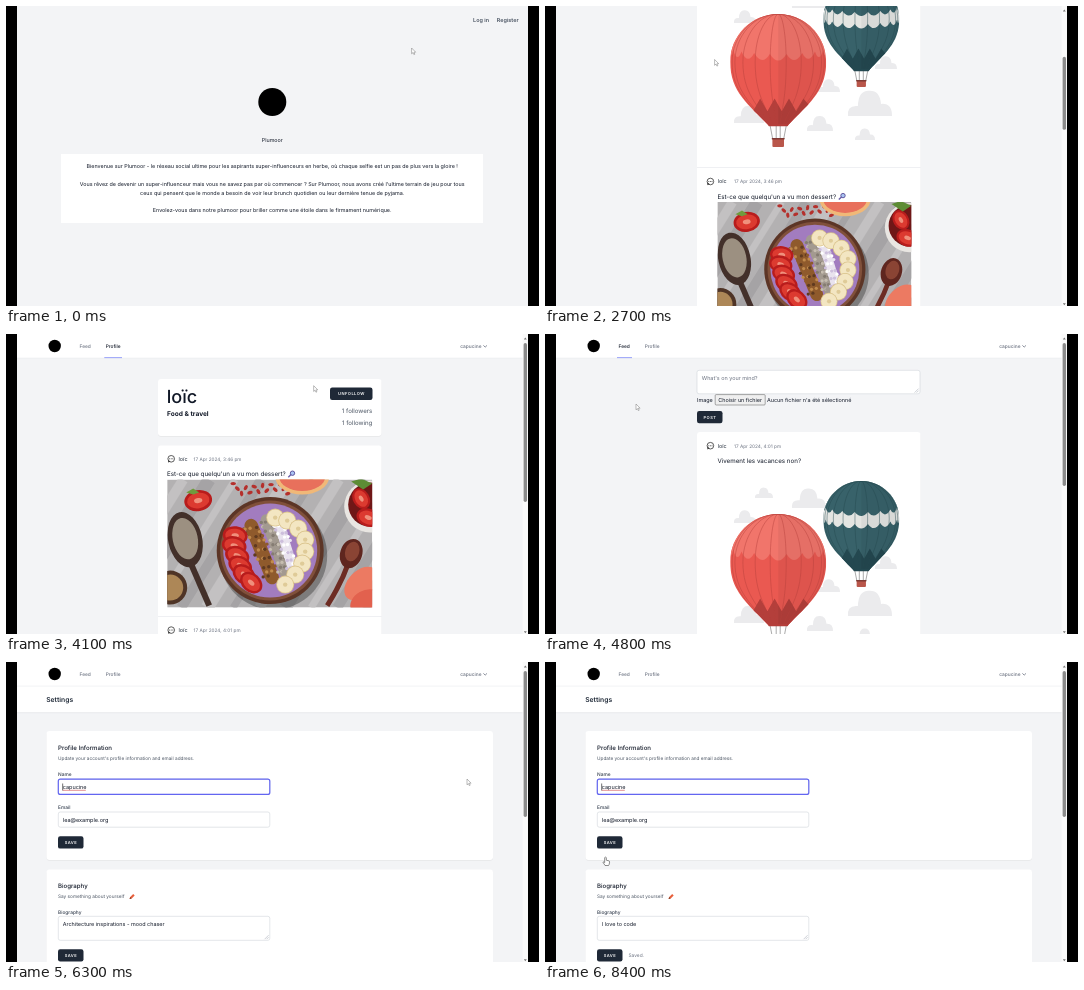
An HTML page that plays this animation: 533 by 300 pixels, repeating every 8.5 s.

```html
<!DOCTYPE html>
<html lang="fr">
<head>
<meta charset="utf-8">
<title>Plumoor</title>
<style>
html,body{margin:0;width:100%;height:100%;overflow:hidden;background:#000}
svg{display:block;width:100%;height:100%}
text{font-family:Inter,Lato,sans-serif;white-space:pre;text-rendering:geometricPrecision}
</style>
</head>
<body>
<svg id="stage" viewBox="0 0 533 300" xmlns="http://www.w3.org/2000/svg"></svg>
<script>
const LOOP = 8500;
const BRAND = 'Plumoor', USER = 'capucine', AUTHOR = 'loïc', EMAIL = 'lea@example.org';
const INK = '#111827', GREY = '#6b7280', LINE = '#d1d5db', INDIGO = '#6366f1';
const OLD_BIO = 'Architecture inspirations - mood chaser', NEW_BIO = 'I love to code';
const FONT_SCALE = .928; // Inter runs wide for its size

// --- drawing helpers, all return SVG markup ---
const text = (x, y, s, size = 5.86, fill = INK, weight = 400, extra = '') =>
  `<text x="${x}" y="${y}" font-size="${(size * FONT_SCALE).toFixed(2)}" fill="${fill}" font-weight="${weight}" ${extra}>${s}</text>`;
const rect = (x, y, w, h, fill, extra = '') =>
  `<rect x="${x}" y="${y}" width="${w}" height="${h}" fill="${fill}" ${extra}/>`;
const circle = (x, y, r, fill, extra = '') => `<circle cx="${x}" cy="${y}" r="${r}" fill="${fill}" ${extra}/>`;
const oval = (x, y, rx, ry, fill, turn = 0) =>
  `<ellipse cx="${x}" cy="${y}" rx="${rx}" ry="${ry}" fill="${fill}" transform="rotate(${turn} ${x} ${y})"/>`;
const path = (d, fill = 'none', extra = '') => `<path d="${d}" fill="${fill}" ${extra}/>`;
const stroke = (color, w) => `stroke="${color}" stroke-width="${w}"`;
const group = (id, body, extra = '') => `<g id="${id}" ${extra}>${body}</g>`;
const range = (n, f) => Array.from({length: n}, (_, i) => f(i)).join('');
const MIDDLE = 'text-anchor="middle"', END = 'text-anchor="end"';

const card = (x, y, w, h) =>
  rect(x, y + .7, w, h, '#000', 'rx="3" opacity=".06"') + rect(x, y, w, h, '#fff', 'rx="3"');
const field = (x, y, w, h, fill = '#fff') => rect(x, y, w, h, fill, `rx="2" ${stroke(LINE, .6)}`);
const ring = (id, x, y, w, h) => group(id, rect(x, y, w, h, 'none', `rx="2" ${stroke(INDIGO, 1.2)}`));
const button = (x, y, w, label) => rect(x, y, w, 12.3, '#1f2937', 'rx="2.2"') +
  text(x + w / 2 + .2, y + 7.7, label, 4.4, '#fff', 600, MIDDLE + ' letter-spacing=".42"');
const grip = (x, y) => path(`M${x - 4} ${y}l4-4M${x - 2} ${y}l2-2`, 'none', stroke('#9ca3af', .5));

function nav(active) {
  const link = (x, s) => text(x, 14.4, s, 5.2, active === s ? INK : GREY, 500);
  const bar = {Feed: [72, 15], Profile: [98.3, 17.7]}[active];
  return rect(11, 0, 511, 24, '#fff') + rect(11, 23.8, 511, .5, '#e5e7eb') + circle(48.7, 12, 6.2, '#000') +
    link(73.5, 'Feed') + link(99.7, 'Profile') + (bar ? rect(bar[0], 23.3, bar[1], .8, '#818cf8') : '') +
    text(475.5, 14.3, USER, 5.2, GREY, 500, END) + path('M477.4 11.4l1.8 1.7 1.8-1.7', 'none', stroke(GREY, .8));
}

const magnifier = (x, y) =>
  path(`M${x - 3.2} ${y + 3.2}L${x} ${y}`, 'none', stroke('#6b5fa8', 1.4)) +
  circle(x + 1, y - .8, 2.2, '#a9c4f2', stroke('#564a96', .9));

const header = (x, y, time, dateX) =>
  circle(x + 4, y - 1.9, 3.3, '#fff', stroke('#333', .8)) + path(`M${x + .9} ${y + 1.8}l.3-2.6 1.9 1.5z`, '#333') +
  range(3, i => circle(x + 2.4 + i * 1.6, y - 1.9, .5, '#333')) +
  text(x + 11.3, y, AUTHOR, 5.86, '#1f2937') + text(dateX, y, '17 Apr 2024, ' + time, 5.1, GREY);

// --- illustration ---
function cloud(x, base, w) {
  const r = w / 2;
  return path(`M${x - r} ${base}q${-r * .05} ${-r * .5} ${r * .45} ${-r * .45}q${r * .02} ${-r * .75} ${r * .55} ${-r * .7}` +
    `q${r * .45} 0 ${r * .5} ${r * .6}q${r * .5} ${-r * .05} ${r * .5} ${r * .55}z`, '#ebebed');
}

function airship(id, cx, top, rx, wide, neck, n, c) {
  const hb = neck - wide, ha = wide - top;
  const gore = u => {
    const a = cx + u * rx;
    return `M${cx} ${top}C${cx + .55 * u * rx} ${top} ${a} ${wide - .55 * ha} ${a} ${wide}` +
      `C${a} ${wide + .48 * hb} ${cx + u * (n + .5 * (rx - n))} ${neck - .32 * hb} ${cx + u * n} ${neck}`;
  };
  const half = u => gore(u) + `H${cx}z`;
  const us = Array.from({length: 10}, (_, i) => Math.sin((i - 4.5) / 9 * Math.PI));
  // scalloped edge running across the envelope
  const edge = (y, dip) => us.slice(1).map((u, i) => {
    const m = (u + us[i]) / 2, end = y + 7 * Math.sqrt(1 - u * u);
    return `Q${cx + m * rx} ${y + 7 * Math.sqrt(1 - m * m) + dip} ${cx + u * rx} ${end}`;
  }).join('');
  const zone = (y, dip, fill) => path(`M${cx - rx} ${top}V${y}` + edge(y, dip) + `V${top}z`, fill);
  return `<clipPath id="${id}"><path d="${half(-1) + half(1)}"/></clipPath><g clip-path="url(#${id})">` +
    rect(cx - rx, top, rx * 2, neck - top, c.body) +
    (c.band ? zone(top + 36, 9, c.band) + zone(top + 24, 8, c.body) : zone(top + 33, 13, c.light)) +
    path(`M${cx - rx} ${neck}V${neck - hb * .4}` +
      range(8, i => `L${cx - rx * .6 + (i + .5) * rx * .15} ${neck - hb * (.22 + .2 * (i % 2))}`) + `L${cx + rx} ${neck}z`, c.dark) +
    path(half(1), '#000', 'opacity=".05"') +
    us.map(u => path(gore(u * .96), 'none', stroke(c.dark, .45))).join('') + '</g>' +
    rect(cx - n, neck - 1, n * 2, 2.2, c.dark, 'rx="1"') +
    path(`M${cx - n * .8} ${neck + 1}l${n * .25} ${c.drop}M${cx + n * .8} ${neck + 1}l${-n * .25} ${c.drop}M${cx - 2} ${neck + 1}v${c.drop}M${cx + 2} ${neck + 1}v${c.drop}`, 'none', stroke('#555', .5)) +
    rect(cx - n * .58, neck + c.drop, n * 1.16, c.basket, '#b9564a', 'rx="1"') +
    rect(cx - n * .65, neck + c.drop, n * 1.3, 1.4, '#7f3a34', 'rx=".6"');
}

const scene = () =>
  [[200, 189, 22], [219, 164, 18], [264, 174, 34], [341, 235, 22], [284, 258, 22], [325, 282, 44], [204, 289, 30], [275, 297, 26], [320, 306, 20]]
    .map(a => cloud(...a)).join('') +
  airship('teal', 316.3, 147, 38, 185, 236, 8, {body: '#38626a', dark: '#244850', band: '#e4e5e2', drop: 10, basket: 7}) +
  airship('red', 233.2, 180, 48, 228, 291, 10, {body: '#ea5951', light: '#f1756b', dark: '#b43f3b', drop: 13, basket: 9});

// --- photo, 205 x 128 ---
function berry(x, y, r, turn) {
  return oval(x, y, r, r * .75, '#b81c1c', turn) + oval(x, y, r * .8, r * .55, '#dc3a30', turn) + oval(x, y, r * .3, r * .18, '#f0907c', turn);
}
// a strip of topping: solid base with scattered specks
function strip(n, x, y, dx, dy, spread, colors) {
  return path(`M${x} ${y}l${dx} ${dy}`, 'none', stroke(colors[0], spread * .9) + ' stroke-linecap="round"') +
    range(n, i => {
      const k = (i * .618) % 1, s = ((i * .414) % 1 - .5) * spread;
      return circle((x + dx * k + s).toFixed(1), (y + dy * k - s * .45).toFixed(1), 1.7, colors[i % colors.length]);
    });
}
const photo = () => rect(0, 0, 205, 128, '#b3b1b2') +
  range(12, i => path(`M${i * 26 - 90} 128L${i * 26 - 10} 0`, 'none', stroke(i % 2 ? '#c3c1c2' : '#a5a3a5', 7 + i % 3 * 3))) +
  range(14, i => oval(66 + i * 4.2, 4 + (i * 5) % 11, 2.8, 1.7, '#b5302c', i * 40)) +
  oval(135, -3, 27, 18, '#f0b878') + oval(135, -3, 23, 14.5, '#e8705c') +
  berry(31, 21, 14, -10) + path('M19 13l7-4 6 4-6 2z', '#6f9b3e') +
  circle(203, 27, 26, '#e9e6e2') + circle(203, 25, 22, '#6f1717') + berry(194, 19, 11, 60) + berry(201, 38, 12, 20) + path('M184 2l10-3 11 5-9 6z', '#5d8c35') +
  path('M22 80L42 126', 'none', stroke('#43302a', 6)) + oval(18, 60, 17, 28, '#43302a', -12) + oval(18, 59, 12.5, 21, '#9c9081', -12) +
  circle(3, 108, 17, '#4f3426') + circle(3, 108, 13, '#ad8757') +
  path('M181 84Q174 104 160 126', 'none', stroke('#6d2c23', 5)) + oval(184, 74, 11, 15, '#5f261f', 18) + oval(185, 72, 7, 10, '#8a4434', 18) +
  oval(194, 104, 20, 13, '#ec7a62', -45) + oval(198, 122, 16, 11, '#e2614e', -30) +
  circle(106, 76, 54, '#000', 'opacity=".3"') + circle(103, 71, 53.5, '#5c3526') + circle(103, 71, 50, '#80503a') + circle(103, 71, 47, '#a27cbf') +
  strip(40, 84, 46, 21, 52, 15, ['#8f5a2c', '#c08a4c', '#5f3a20']) +
  strip(44, 99, 40, 19, 54, 12, ['#a39a90', '#857c72', '#c6bdb0']) +
  strip(36, 112, 44, 14, 46, 11, ['#e9e3ee', '#fff', '#cdbfdc']) +
  [[68, 56], [67, 66], [70, 76], [73, 86], [77, 95], [84, 103]].map(([x, y], i) => berry(x, y, 12.5, 8 + i * 7)).join('') +
  [[108, 38], [120, 41], [131, 49], [138, 60], [138, 72], [135, 84], [128, 95], [118, 105]].map(([x, y]) =>
    circle(x, y, 9, '#d9c28a') + circle(x, y, 8.2, '#f3e6c2') + circle(x, y, 2.2, '#dfcb98')).join('');

// --- screens ---
const landing = text(467.1, 15.6, 'Log in', 5.86, '#4b5563', 600) + text(490.8, 15.6, 'Register', 5.86, '#4b5563', 600) +
  circle(266.3, 96, 14, '#000') + text(266.3, 136, BRAND, 5.8, INK, 400, MIDDLE) + rect(55, 148, 422, 69, '#fff') +
  [[162.4, `Bienvenue sur ${BRAND} - le réseau social ultime pour les aspirants super-influenceurs en herbe, où chaque selfie est un pas de plus vers la gloire !`],
   [180, `Vous rêvez de devenir un super-influenceur mais vous ne savez pas par où commencer ? Sur ${BRAND}, nous avons créé l'ultime terrain de jeu pour tous`],
   [189, 'ceux qui pensent que le monde a besoin de voir leur brunch quotidien ou leur dernière tenue de pyjama.'],
   [206.4, `Envolez-vous dans notre ${BRAND.toLowerCase()} pour briller comme une étoile dans le firmament numérique.`]]
    .map(([y, s]) => text(266.2, y, s, 5.8, INK, 400, MIDDLE)).join('');

const login = circle(266.3, 97.5, 6.8, '#000') + card(184, 115, 164.5, 99) +
  text(193, 126.4, 'Email', 5.2, '#374151', 500) + field(193, 129.6, 147, 15.6, '#e8f0fe') + text(197.5, 139.5, EMAIL, 6) +
  text(193, 156.6, 'Password', 5.2, '#374151', 500) + field(193, 159.8, 147, 15.4, '#e8f0fe') +
  range(10, i => circle(198.9 + i * 2.9, 168, .9, INK)) +
  rect(193.3, 182, 5.4, 5.4, '#fff', `rx="1" ${stroke(LINE, .6)}`) + text(202, 186.7, 'Remember me', 5.2, GREY) +
  text(305.5, 204.2, 'Forgot your password?', 5.1, GREY, 400, END + ' text-decoration="underline"') +
  button(310, 196, 30, 'LOG IN') + ring('mailRing', 193, 129.6, 147, 15.6) + ring('loginRing', 308.8, 194.8, 32.4, 14.7);

const feed = nav('Feed') + field(152, 36.3, 223, 23.5) + text(156.8, 45.6, "What's on your mind?", 5.86, GREY) + grip(373.6, 58.6) +
  text(152, 67.8, 'Image') + rect(170.2, 60.6, 50, 10.4, '#efefef', `rx="1" ${stroke('#555', .5)}`) +
  text(195.2, 67.8, 'Choisir un fichier', 5.86, INK, 400, MIDDLE) + text(222, 67.8, "Aucun fichier n'a été sélectionné") +
  button(152, 77, 25.5, 'POST') + card(152, 98, 223.5, 403) +
  header(161.4, 113.6, '4:01 pm', 189) + text(172.4, 129.4, 'Vivement les vacances non?', 6.7) + scene() +
  rect(152, 333, 223.5, .6, '#e5e7eb') +
  header(161.4, 349.4, '3:46 pm', 189) + text(172.4, 364.7, "Est-ce que quelqu'un a vu mon dessert?", 6.7) + magnifier(297, 362.4) +
  '<use href="#photo" transform="translate(172.4 368) scale(.946)"/>';

const profile = nav('Profile') + card(152, 45, 223.5, 57) + text(160.8, 68.6, AUTHOR, 19.5, INK, 500) +
  text(161, 81.6, 'Food &amp; travel', 7.1, INK, 700) +
  group('follow', button(333, 53.6, 33.5, 'FOLLOW')) + group('unfollow', button(324, 53.6, 42.5, 'UNFOLLOW')) +
  text(366.3, 79.4, '0 followers', 6.6, '#4b5563', 400, END + ' id="followers"') + text(366.3, 91.2, '1 following', 6.6, '#4b5563', 400, END) +
  card(152, 111.5, 223.5, 400) + header(161.2, 126.7, '3:46 pm', 187.5) +
  text(161, 142.4, "Est-ce que quelqu'un a vu mon dessert?", 6.7) + magnifier(285.5, 140) +
  '<use href="#photo" transform="translate(161.2 145.6)"/>' + rect(152, 282, 223.5, .6, '#e5e7eb') +
  header(161.2, 298, '4:01 pm', 187.5);

const label = (y, s) => text(52, y, s, 5.2, '#374151', 500);
const section = (y, h, title, sub) => card(40.5, y, 446.5, h) + text(52, y + 18.6, title, 6.6, INK, 500) + text(52, y + 28.8, sub, 5.1, '#4b5563');
const settings = rect(11, 24, 511, 26.5, '#fff') + rect(11, 50.5, 511, .7, '#e2e4e8') + nav('') +
  text(40.2, 40.2, 'Settings', 7.3, '#1f2937', 600) +
  section(69, 129, 'Profile Information', "Update your account's profile information and email address.") +
  label(113.9, 'Name') + field(52.3, 117.2, 211.5, 15.2) + ring('nameRing', 52.3, 117.2, 211.5, 15.2) +
  text(56.8, 127, USER, 5.9) + path('M56.8 128.3h23', 'none', stroke('#d04545', .6)) + group('nameCaret', rect(56.5, 121.5, .6, 7, '#111')) +
  label(147, 'Email') + field(52.3, 150, 211.5, 15.2) + text(56.8, 159.8, EMAIL, 6) + button(52, 174.3, 25.5, 'SAVE') +
  section(207.5, 103, 'Biography', 'Say something about yourself') +
  path('M123.6 237l.6-2 3-3 1.5 1.5-3 3z', '#e8603c') + path('M123.6 237l.6-2 1.4 1.5z', '#7a3b24') +
  label(252.3, 'Biography') + field(52.3, 254.3, 211.5, 24) + ring('bioRing', 52.3, 254.3, 211.5, 24) + grip(262.6, 277.2) +
  group('bioMark', rect(56.5, 258.2, 105, 7.4, '#a8c7fa')) + text(56.8, 264.2, '', 5.86, INK, 400, 'id="bio"') +
  button(52, 287.2, 25.5, 'SAVE') + text(83.5, 295.4, 'Saved.', 5.2, GREY, 400, 'id="saved"') +
  section(320, 175, 'Update Password', 'Ensure your account is using a long, random password to stay secure.') +
  label(364.9, 'Current Password') + field(52.3, 368.2, 211.5, 15.2) + label(398, 'New Password') + field(52.3, 401.2, 211.5, 15.2);

const menu = card(411, 21, 70, 28) + text(416.5, 31.6, 'Settings', 5.2, '#374151') + text(416.5, 43.6, 'Log Out', 5.2, '#374151');

const pointers =
  group('arrow', path('M0 0v5.8l1.4-1.2.9 2 .9-.4-.9-2h1.8z', '#fff', stroke('#777', .5))) +
  group('hand', path('M-.8.6q.8-1 1.6 0v2.6l2.6.7q.8.3.7 1.2l-.4 2.2-.7 1.2h-3.4l-2-3q0-.9.9-.6l.7.6z', '#fff', stroke('#333', .55))) +
  group('beam', path('M-1-3h2M0-3v6M-1 3h2', 'none', stroke('#222', .6)));

const screens = {landing, login, feed, profile, settings};
document.getElementById('stage').innerHTML =
  `<defs><clipPath id="frame"><rect width="205" height="128"/></clipPath>${group('photo', photo(), 'clip-path="url(#frame)"')}</defs>` +
  rect(11, 0, 511, 300, '#f3f4f6') + Object.entries(screens).map(([id, body]) => group(id, body)).join('') +
  group('dropdown', menu) +
  group('bar', rect(516.6, 0, 5.4, 300, '#fafafa') + path('M517.8 5.6l1.5-2 1.5 2zM517.8 297.2l1.5 2 1.5-2z', '#777') +
    rect(517.6, 9, 3.4, 100, '#8b8b8b', 'rx="1.7" id="thumb"')) +
  rect(0, 0, 11, 300, '#000') + rect(522, 0, 11, 300, '#000') + group('pointer', pointers);

// --- timeline ---
const $ = id => document.getElementById(id);
const show = (id, on) => $(id).style.display = on ? '' : 'none';
const put = (id, s) => { if ($(id).textContent !== s) $(id).textContent = s; };
const within = (t, a, b) => t >= a && t < b;

// keys: [time, value, value...], eased between neighbours
function track(keys, t) {
  const i = keys.findIndex(k => k[0] > t);
  if (i < 0) return keys[keys.length - 1].slice(1);
  if (i === 0) return keys[0].slice(1);
  const a = keys[i - 1], b = keys[i], k = (t - a[0]) / (b[0] - a[0]), e = k * k * (3 - 2 * k);
  return a.slice(1).map((v, j) => v + (b[j + 1] - v) * e);
}

const MOVES = [[0, 405.6, 42], [300, 474, 12], [500, 474, 12], [900, 137, 148], [1200, 240, 138], [1700, 319, 201], [2200, 319, 201],
  [2700, 169.6, 53.5], [2900, 178, 174], [3000, 178, 174], [3400, 416, 91.5], [3800, 350, 59], [4000, 350, 59], [4400, 79, 12],
  [4500, 79, 12], [4800, 91, 70], [5100, 130, 145], [5300, 130, 145], [5600, 468, 12], [5700, 468, 12], [5900, 440, 29], [6000, 440, 29],
  [6300, 461, 117], [6700, 461, 117], [7200, 150, 166], [7400, 120, 166], [8000, 120, 166], [8300, 60.5, 195]];
const SCROLL = [[2200, 0], [2600, 172], [2999, 172], [3000, 0], [4800, 0], [5150, 175], [5300, 175], [5600, 0],
  [6600, 0], [7100, 98], [8399, 98], [8400, 0]];
const CUTS = [[500, 'landing', 0], [2100, 'login', 0], [3000, 'feed', 73], [4500, 'profile', 159], [6000, 'feed', 143], [LOOP, 'settings', 146]];
const HANDS = [[300, 600], [1600, 2200], [2900, 3100], [3700, 4100], [4300, 4600], [5500, 6100], [8200, 8500]];
const BEAMS = [[1100, 1400], [7200, 8100]];

function draw(t) {
  const [, page, thumb] = CUTS.find(c => t < c[0]);
  const [scroll] = track(SCROLL, t), [x, y] = track(MOVES, t);
  for (const id in screens) show(id, id === page);
  $(page).setAttribute('transform', `translate(0 ${-scroll})`);
  show('bar', thumb > 0);
  $('thumb').setAttribute('height', thumb);
  $('thumb').setAttribute('y', 9 + scroll * thumb / 300);

  show('mailRing', t < 1700);
  show('loginRing', t >= 1700);
  const followed = t >= 3900;
  show('follow', !followed);
  show('unfollow', followed);
  put('followers', followed ? '1 followers' : '0 followers');
  show('dropdown', within(t, 5700, 6000));

  const editing = within(t, 7300, 8400);
  show('nameRing', !editing);
  show('nameCaret', !editing);
  show('bioRing', editing);
  show('bioMark', within(t, 7400, 7600));
  const typed = Math.round((t - 7500) / 500 * NEW_BIO.length);
  put('bio', t < 7600 ? OLD_BIO : NEW_BIO.slice(0, typed));
  show('saved', t >= 8400);

  const hand = HANDS.some(h => within(t, ...h)), beam = BEAMS.some(b => within(t, ...b));
  show('hand', hand);
  show('beam', beam);
  show('arrow', !hand && !beam);
  $('pointer').setAttribute('transform', `translate(${x} ${y})`);
}

const start = performance.now();
function tick() {
  const t = (performance.now() - start) % LOOP;
  draw(Math.floor(t / 100) * 100);
  requestAnimationFrame(tick);
}
tick();
</script>
</body>
</html>
```
